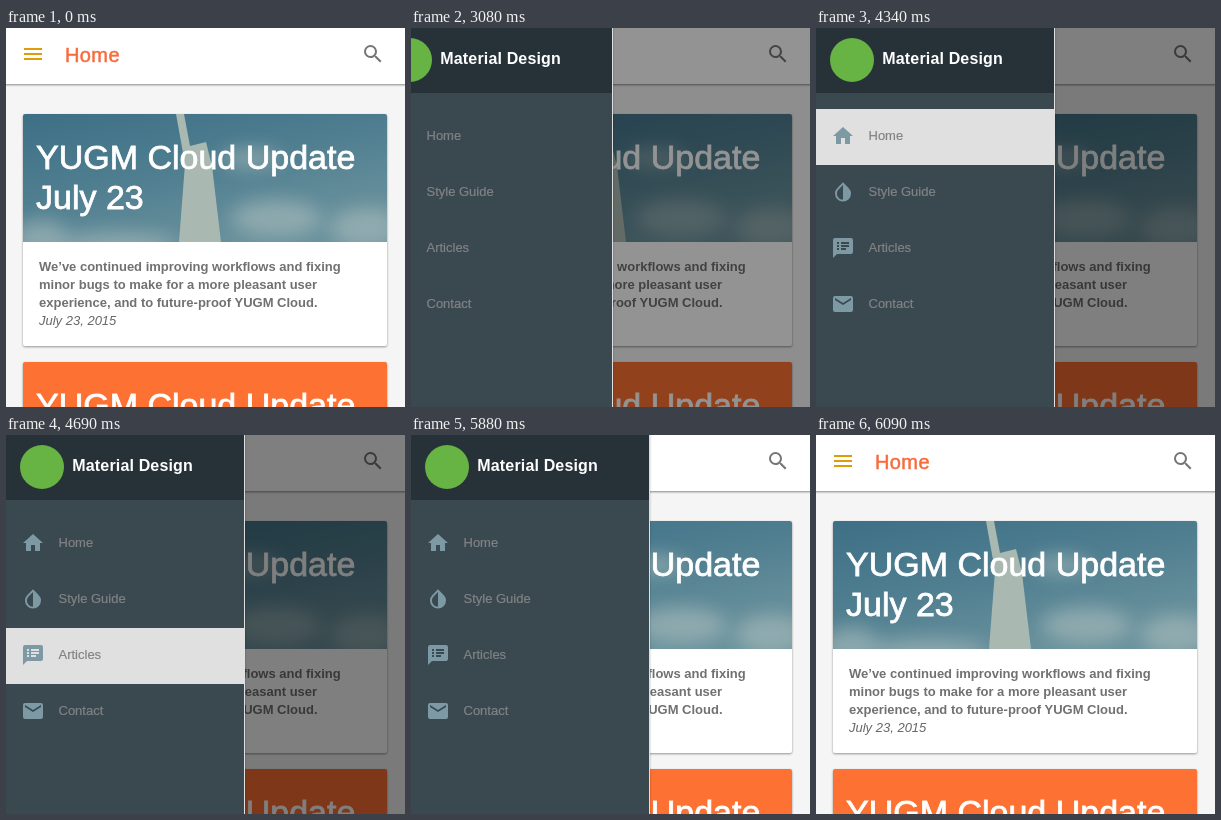
An HTML page for the animation above (7.49 s loop, 399x379 px).

```html
<!DOCTYPE html>
<html lang="en">
<head>
<meta charset="utf-8">
<title>Card feed with drawer</title>
<style>
  html, body { margin: 0; width: 100%; height: 100%; overflow: hidden; background: #f5f5f5; }
  svg { display: block; }
  text { font-family: "Liberation Sans", Arial, sans-serif; white-space: pre; }

  .bar { fill: #fff; filter: drop-shadow(0 1px 1px rgba(0, 0, 0, .45)); }
  .card { filter: drop-shadow(0 1px 1px rgba(0, 0, 0, .4)); }
  .page-title { font-size: 20px; letter-spacing: .4px; fill: #f76b3c; stroke: #f76b3c; stroke-width: .5px; }
  .headline { font-size: 34px; fill: #fff; stroke: #fff; stroke-width: .8px; }
  .summary { font-size: 13px; font-weight: bold; fill: #717171; }
  .date { font-weight: normal; font-style: italic; fill: #666; }
  .search { fill: #757575; }
  .brand { font-size: 16px; font-weight: bold; letter-spacing: .16px; fill: #fff; }
  .menu text { font-size: 13px; fill: #808385; stroke: #808385; stroke-width: .2px; }
  .menu path { fill: #7d99a4; }

  .scrim, .drawer, .hover { animation: 7490ms step-end infinite; }
  .scrim { animation-name: scrim; }
  .drawer { animation-name: slide; filter: drop-shadow(0 1px 1px rgba(0, 0, 0, .25)); }
  .hover { animation-name: hover; fill: #e0e0e0; }

  /* Samples of a 200 ms cubic-bezier(.4, 0, .2, 1), one every 70 ms */
  @keyframes slide {
    0%, 81.30% { transform: translateX(-250px); }
    40.18% { transform: translateX(-206px); }
    41.12% { transform: translateX(-37px); }
    42.05% { transform: translateX(-2px); }
    42.99%, 78.50% { transform: none; }
    79.43% { transform: translateX(-125px); }
    80.37% { transform: translateX(-235px); }
    100% { transform: translateX(-250px); }
  }
  @keyframes scrim {
    0%, 78.50%, 100% { opacity: 0; }
    40.18% { opacity: .08; }
    41.12% { opacity: .425; }
    42.05% { opacity: .495; }
    42.99% { opacity: .5; }
  }
  @keyframes hover {
    0%, 69.15%, 100% { opacity: 0; transform: none; }
    57.94%, 68.22% { opacity: 1; transform: none; }
    60.74% { opacity: 1; transform: translateY(56px); }
    62.61% { opacity: 1; transform: translateY(112px); }
  }
</style>
</head>
<body>
<svg width="399" height="379" viewBox="0 0 399 379">
  <defs>
    <linearGradient id="sky" x2=".6" y2="1">
      <stop offset="0" stop-color="#3d6f86"/>
      <stop offset=".5" stop-color="#4f7e90"/>
      <stop offset="1" stop-color="#6a929d"/>
    </linearGradient>
    <filter id="soft" x="-50%" y="-50%" width="200%" height="200%">
      <feGaussianBlur stdDeviation="9"/>
    </filter>
    <clipPath id="media"><path d="M17 214V88a2 2 0 0 1 2-2h360a2 2 0 0 1 2 2v126z"/></clipPath>
  </defs>

  <rect width="399" height="379" fill="#f5f5f5"/>

  <g class="card"><rect x="17" y="86" width="364" height="232" rx="2" fill="#fff"/></g>
  <g clip-path="url(#media)">
    <rect x="17" y="86" width="364" height="128" fill="url(#sky)"/>
    <g filter="url(#soft)" fill="#a9bcbc" opacity=".6">
      <ellipse cx="35" cy="212" rx="28" ry="20"/>
      <ellipse cx="110" cy="216" rx="60" ry="12"/>
      <ellipse cx="270" cy="190" rx="45" ry="18"/>
      <ellipse cx="360" cy="200" rx="35" ry="20"/>
      <ellipse cx="245" cy="130" rx="30" ry="10"/>
    </g>
    <path d="M170 86h8l6 32 16-4 6 24 9 76h-42l6-78z" fill="#a9b9b1"/>
  </g>
  <g class="headline">
    <text x="30" y="141">YUGM Cloud Update</text>
    <text x="30" y="181">July 23</text>
  </g>
  <g class="summary">
    <text x="33" y="243">We’ve continued improving workflows and fixing</text>
    <text x="33" y="261">minor bugs to make for a more pleasant user</text>
    <text x="33" y="279">experience, and to future-proof YUGM Cloud.</text>
    <text x="33" y="297" class="date">July 23, 2015</text>
  </g>

  <g class="card"><rect x="17" y="334" width="364" height="232" rx="2" fill="#fd7133"/></g>
  <text class="headline" x="30" y="389">YUGM Cloud Update</text>

  <rect class="bar" x="-5" y="-5" width="409" height="61"/>
  <path d="M18 20h18v2H18zm0 5h18v2H18zm0 5h18v2H18z" fill="#e09c08"/>
  <text class="page-title" x="59" y="34">Home</text>
  <path class="search" transform="translate(355 14)" d="M15.5 14h-.79l-.28-.27A6.47 6.47 0 0 0 16 9.5 6.5 6.5 0 1 0 9.5 16c1.61 0 3.09-.59 4.23-1.57l.27.28v.79l5 4.99L20.49 19zm-6 0a4.5 4.5 0 1 1 0-9 4.5 4.5 0 0 1 0 9z"/>

  <rect class="scrim" width="399" height="379"/>

  <g class="drawer">
    <rect y="-5" width="239" height="389" fill="#e0e0e0"/>
    <rect y="-5" width="238" height="389" fill="#3a4850"/>
    <rect y="-5" width="238" height="70" fill="#263238"/>
    <circle cx="36" cy="32" r="22" fill="#67b344"/>
    <text class="brand" x="66.3" y="36">Material Design</text>
    <rect class="hover" y="81" width="238" height="56"/>
    <g class="menu">
      <g transform="translate(15 96)">
        <path d="M10 20v-6h4v6h5v-8h3L12 3 2 12h3v8z"/>
        <text x="37.5" y="16">Home</text>
      </g>
      <g transform="translate(15 152)">
        <path d="M17.66 7.93 12 2.27 6.34 7.93a8 8 0 0 0 0 11.31 8 8 0 0 0 11.32 0 8 8 0 0 0 0-11.31zM12 19.59a6 6 0 0 1-4.24-10.24L12 5.1z"/>
        <text x="37.5" y="16">Style Guide</text>
      </g>
      <g transform="translate(15 208)">
        <path d="M20 2H4a2 2 0 0 0-2 2v18l4-4h14a2 2 0 0 0 2-2V4a2 2 0 0 0-2-2zM8 14H6v-2h2zm0-3H6V9h2zm0-3H6V6h2zm7 6h-5v-2h5zm3-3h-8V9h8zm0-3h-8V6h8z"/>
        <text x="37.5" y="16">Articles</text>
      </g>
      <g transform="translate(15 264)">
        <path d="M20 4H4a2 2 0 0 0-2 2v12a2 2 0 0 0 2 2h16a2 2 0 0 0 2-2V6a2 2 0 0 0-2-2zm0 4-8 5-8-5V6l8 5 8-5z"/>
        <text x="37.5" y="16">Contact</text>
      </g>
    </g>
  </g>
</svg>
</body>
</html>
```
